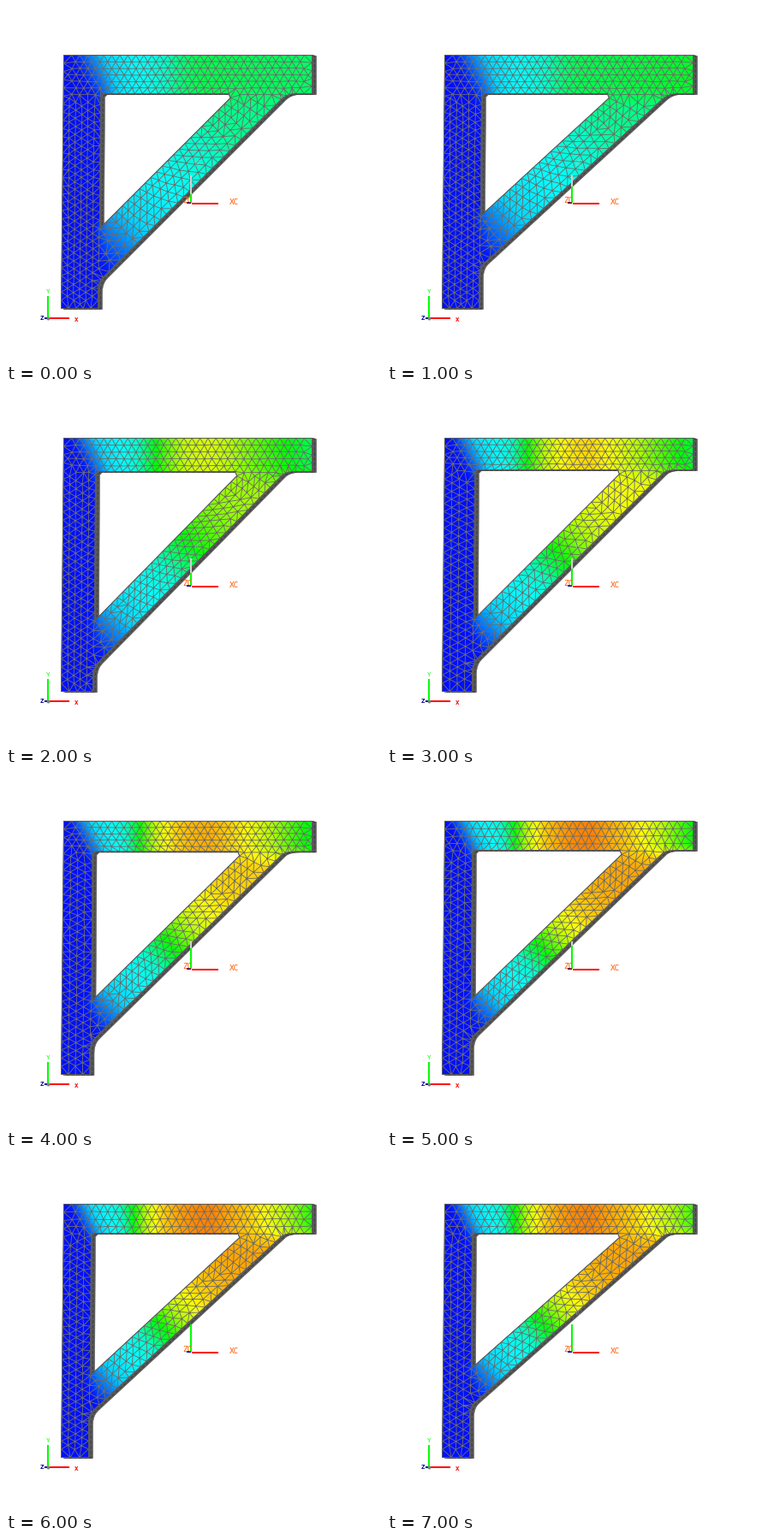
These frames come from a looping animation (438 px wide and 415 px high, 8000 ms). A matplotlib script:

```python
import numpy as np
import matplotlib.pyplot as plt
from matplotlib.animation import ArtistAnimation
from matplotlib.colors import hsv_to_rgb
from matplotlib.patches import PathPatch
from matplotlib.path import Path
from matplotlib.tri import Triangulation

W, H, DPI = 438, 415, 100
PX = 72 / DPI                      # one pixel in points
DEPTH = np.array([5.0, 1.0])       # visible thickness of the bracket
CELL = 9.4                         # mesh edge length
TOP, LEFT, RIGHT, BOTTOM = 57, 67, 357, 353
GREY, DARK, EDGE = "#5a5a5a", "#3c3c3c", "#6c6c6c"

# Colour scale: stress level to position on the blue-to-red rainbow
LEVEL = [0, .1, .23, .31, .5, .58, .675, .78, .88, 1]
RAINBOW = [0, .03, .14, .21, .26, .3, .48, .68, .79, .87]


def smooth(v, lo, hi):
    t = np.clip((v - lo) / (hi - lo), 0, 1)
    return t * t * (3 - 2 * t)


def rise(x, start, span):
    return np.sin(np.pi / 2 * np.clip((x - start) / span, 0, 1))


def curve(a, ctrl, b, n=6):
    t = np.linspace(0, 1, n)[:, None]
    a, ctrl, b = map(np.asarray, (a, ctrl, b))
    return (1 - t) ** 2 * a + 2 * t * (1 - t) * ctrl + t ** 2 * b


class Design:
    """Bracket with equally thick members and a brace of given slope."""

    def __init__(self, step):
        self.thick = np.interp(step, [1, 2, 3, 5], [46, 40, 38, 35])
        self.slope = np.interp(step, [0, 1, 2, 3, 5, 7],
                               [1, .92, 1.02, 1, .965, .885])
        self.under = TOP + self.thick          # lower side of the beam
        self.col = self.under + 9              # right side of the column
        self.hole_x = self.under + 12
        self.gap = (self.thick + 1.5) * np.hypot(1, self.slope)

    def low(self, x):
        """Lower side of the brace."""
        return 1.25 * self.under - 19 + (326 - x) * self.slope

    def high(self, x):
        """Upper side of the brace."""
        return self.low(x) - self.gap

    def high_x(self, y):
        return 326 - (y + self.gap - self.low(326)) / self.slope

    def outline(self):
        """Front face: outer contour and triangular hole."""
        yb, xc, x0 = self.under, self.col, self.hole_x - DEPTH[0]
        meet = 326 + (self.low(326) - yb) / self.slope
        upper = curve((343, yb), (meet, yb), (326, self.low(326)))
        lower = curve((xc + 6, self.low(xc + 6)), (xc, self.low(xc)),
                      (xc, self.low(xc) + 11))
        outer = np.vstack([
            [(LEFT, TOP), (RIGHT, TOP), (RIGHT, yb - 1)],
            upper - DEPTH, lower - DEPTH,
            [(xc - DEPTH[0], BOTTOM), (64, BOTTOM)]])
        tip = self.high_x(yb + 4)
        hole = np.array([(x0 + 3, yb - 1), (x0, yb + 2),
                         (x0 - 1, self.high(x0 - 1)),
                         (tip, yb + 4), (tip - 2, yb - 1)])
        return outer, hole

    def regions(self):
        """Quads to be meshed: beam, column, brace."""
        yb, x0 = self.under, self.hole_x - DEPTH[0]
        tip, foot = self.high_x(yb + 4), self.col + 1
        return [
            ((LEFT, TOP), (RIGHT, TOP), (LEFT, yb), (RIGHT, yb)),
            ((66.5, yb), (64, BOTTOM), (x0, yb), (self.col - 5, BOTTOM)),
            ((x0, self.high(x0)), (tip, yb + 4),
             (foot, self.low(foot + 5) - 1), (321, self.low(326) - 1)),
        ]

    def colours(self):
        y, x = np.mgrid[0:H, 0:W].astype(float)
        yb, m = self.under, self.slope
        load = (35 / self.thick) ** 1.6        # thinner members carry more

        along = x - .5 * (y - 75) * np.clip((150 - x) / 40, 0, 1)
        end = .57 + .1 * load + .4 * (1 - m)
        drop = np.clip((x - 240) / (RIGHT - 240), 0, 1)
        beam = load * rise(along, 72, 160) + (end - load) * drop

        # Position along the centre line of the brace
        off = y - (self.low(x) - self.gap / 2)
        brace = .95 * load * rise(x - off * m / (1 + m * m), 88, 185)

        w = (smooth(x, self.col - 30, self.col + 8)
             * smooth(y, yb - 10, yb + 25)
             * smooth(y - self.high(x), -25, 0))
        v = np.interp(beam * (1 - w) + brace * w, LEVEL, RAINBOW)
        one = np.ones_like(v)
        return hsv_to_rgb(np.dstack([(1 - np.maximum(v, .015)) * 2 / 3,
                                     one, one]))


def face_path(outer, hole):
    return Path.make_compound_path(*[
        Path(np.vstack([p, p[:1]]), closed=True) for p in (outer, hole)])


def resample(poly):
    for a, b in zip(poly, np.roll(poly, -1, axis=0)):
        n = max(1, round(np.hypot(*(b - a)) / CELL))
        for i in range(n):
            yield a + (b - a) * i / n


def lattice(a0, a1, b0, b1):
    """Staggered rows of nodes between the sides a0-a1 and b0-b1."""
    a0, a1, b0, b1 = map(np.array, (a0, a1, b0, b1))
    length = np.hypot(*(a1 - a0))
    ux, uy = (b1 - b0) / np.hypot(*(b1 - b0))
    dx, dy = b0 - a0
    rows = max(2, round(abs(ux * dy - uy * dx) / 7.9))
    cols = round(length / CELL)
    for r in range(rows + 1):
        p, q = a0 + (b0 - a0) * r / rows, a1 + (b1 - a1) * r / rows
        for c in range(cols + 1):
            yield p + (q - p) * (c + r % 2 / 2) / cols


def mesh(design, outer, hole):
    rng = np.random.default_rng(4)
    solid, void = Path(outer), Path(hole)
    pts = []

    def add(p, clear):
        if not pts or np.min(np.hypot(*(np.array(pts) - p).T)) > clear:
            pts.append(p)

    for contour in (outer, hole):
        for p in resample(contour):
            add(p, 2.5)
    for quad in design.regions():
        for p in lattice(*quad):
            p = p + rng.uniform(-.5, .5, 2)
            if solid.contains_point(p) and not void.contains_point(p):
                add(p, 5.4)
    tri = Triangulation(*np.array(pts).T)
    mid = np.c_[tri.x[tri.triangles].mean(1), tri.y[tri.triangles].mean(1)]
    tri.set_mask(~solid.contains_points(mid) | void.contains_points(mid))
    return tri


fig = plt.figure(figsize=(W / DPI, H / DPI), dpi=DPI, facecolor="white")
ax = fig.add_axes([0, 0, 1, 1])
ax.axis("off")


def line(x, y, color, z=8):
    return ax.plot(x, y, color=color, lw=2 * PX, zorder=z,
                   solid_capstyle="butt")[0]


def label(x, y, text, color, size, **kw):
    ax.text(x, y, text, color=color, fontsize=size * PX, ha="center",
            va="center_baseline", family="DejaVu Sans Mono", zorder=9, **kw)


def bracket(step):
    design = Design(step)
    outer, hole = design.outline()
    face = face_path(outer, hole)
    art = []

    def patch(path, fill, edge, z, **kw):
        p = PathPatch(path, facecolor=fill, edgecolor=edge, zorder=z, **kw)
        art.append(ax.add_patch(p))

    for k in np.linspace(1, 0, 6):
        shift = DEPTH * k
        patch(face_path(outer + shift, hole + shift), GREY, GREY, 1, lw=.4)
    half = DEPTH * .55
    patch(face_path(outer + half, hole + half), "none", DARK, 2,
          lw=PX, ls=(0, (4, 2)))

    art.append(ax.imshow(design.colours(), interpolation="nearest",
                         aspect="auto", zorder=3))
    art += ax.triplot(mesh(design, outer, hole), color=EDGE, lw=.9 * PX,
                      marker="", zorder=4, solid_capstyle="butt")
    for a in art[-3:]:
        a.set_clip_path(face, ax.transData)
    patch(face, "none", GREY, 5, lw=PX)

    # The vertical axis is pale where it crosses the body
    cross = max(198, design.low(216))
    art.append(line([215.5] * 2, [198, cross], "#d2d2d2"))
    art.append(line([215.5] * 2, [cross, 230], "#00ff00"))
    return art


frames = [bracket(step) for step in range(8)]

# Work coordinate system
line([216, 247.5], [230.5, 230.5], "#ff0000")
line([210, 215], [229.5, 229.5], "#0000a0")
label(265.8, 228, "XC", "#ff5a00", 9.4)
label(211.5, 226, "ZC", "#ff5a00", 9.4)
label(223, 183, "YC", "#d8d8d8", 8, alpha=.4)

# View triad
line([48.5, 48.5], [338.5, 364], "#00ff00")
line([49.5, 73.5], [364.5, 364.5], "#ff0000")
line([44, 48], [364.5, 364.5], "#000080")
ax.plot(48.2, 364.7, "o", color="#808080", ms=4 * PX, mew=0, zorder=9)
label(49, 333, "Y", "#00ff00", 7.5)
label(81.7, 365.7, "X", "#ff0000", 7.5, weight="bold")
label(41.7, 364, "Z", "#0000a0", 7.5, weight="bold")

ax.set_xlim(-.5, W - .5)
ax.set_ylim(H - .5, -.5)

anim = ArtistAnimation(fig, frames, interval=1000, repeat=True,
                       repeat_delay=0, blit=False)
plt.show()
```
